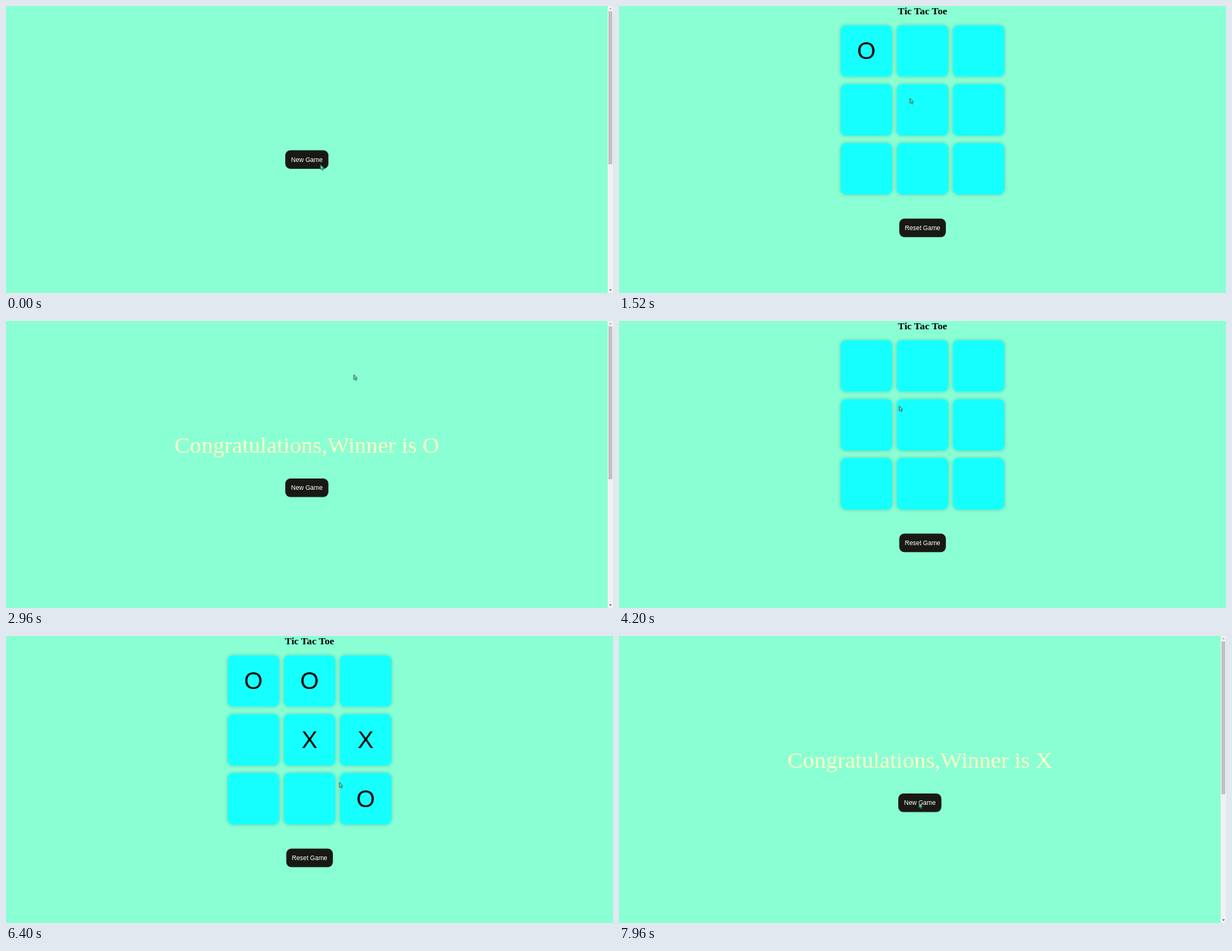
These frames come from a looping animation (800x379 px, 8000 ms). An HTML page:

```html
<!DOCTYPE html>
<html lang="en">
<head>
<meta charset="utf-8">
<title>Tic Tac Toe</title>
<style>
  html, body { margin: 0; width: 100%; height: 100%; overflow: hidden; background: #8affd4; }
  svg { display: block; width: 100%; height: 100%; }
  text { text-anchor: middle; }
  .sans { font-family: "Liberation Sans", Arial, sans-serif; }
  .serif { font-family: "Liberation Serif", "Times New Roman", serif; }
  .mark { font-size: 31.5px; }
  .label { font-size: 8.33px; fill: #fff; }
</style>
</head>
<body>
<svg viewBox="0 0 800 379">
  <defs>
    <filter id="shadow" x="-20%" y="-20%" width="140%" height="140%">
      <feDropShadow dx="0" dy="0" stdDeviation="2.4" flood-color="#000" flood-opacity=".22"/>
    </filter>
  </defs>
  <rect width="800" height="379" fill="#8affd4"/>

  <g id="board">
    <text class="serif" x="400" y="11" font-size="13.33" font-weight="700">Tic Tac Toe</text>
    <g id="cells"></g>
    <g transform="translate(400.1 293)">
      <rect x="-30.7" y="-12.2" width="61.4" height="24.4" rx="6.67" fill="#191913"/>
      <text class="sans label" y="2.8">Reset Game</text>
    </g>
  </g>

  <g id="result">
    <text id="message" class="serif" x="396.5" y="174" font-size="30.4" fill="#ffffc7"></text>
    <g id="newGame">
      <rect x="-28.4" y="-12.2" width="56.8" height="24.4" rx="6.67" fill="#191913"/>
      <text class="sans label" y="2.8">New Game</text>
    </g>
    <rect x="793" width="7" height="379" fill="#f1f1f1"/>
    <rect x="794" y="7" width="5" height="202" fill="#c1c1c1"/>
    <path d="M795 4.3h3.4l-1.7-2z" fill="#a3a3a3"/>
    <path d="M795 374.2h3.4l-1.7 2z" fill="#505050"/>
  </g>

  <path id="cursor" d="M.4.4V6.9L1.9 5.6 3 8 4.2 7.4 3.2 5.2H5.1Z"
        fill="#5be0b4" stroke="#35543f" stroke-width=".7" stroke-linejoin="round"/>
</svg>

<script>
const LOOP = 8000;
const CELL = { x: 292.1, y: 25.5, dx: 74, dy: 77.8, size: 67.8 };
const REST_BEFORE = 160, REST_AFTER = 100;
const $ = id => document.getElementById(id);

// Clicks (time, x, y); the game below decides what each one does
const clicks = [
  [280, 414, 209],
  [1000, 328, 72], [1680, 383, 121.5], [2080, 396, 68], [2480, 464, 130], [2860, 458, 70.5],
  [3660, 401, 222],
  [4600, 356, 68], [4920, 392, 130], [5200, 400, 68], [5520, 463, 129],
  [5820, 521, 172], [6180, 476, 213], [6820, 321, 129],
  [7660, 562, 161], [LOOP, 395, 220]
];

function cellAt(x, y) {
  const col = Math.floor((x - CELL.x) / CELL.dx);
  const row = Math.floor((y - CELL.y) / CELL.dy);
  const inside = col >= 0 && col < 3 && row >= 0 && row < 3;
  return inside ? row * 3 + col : -1;
}

// Start cell and step of every row, column and diagonal
const lines = [0, 1, 2].flatMap(i => [[3 * i, 1], [i, 3]]).concat([[0, 4], [2, 2]]);

function winnerOf(grid) {
  const line = lines.find(([a, d]) =>
    grid[a] && grid[a] === grid[a + d] && grid[a] === grid[a + 2 * d]);
  return line ? grid[line[0]] : "";
}

function gameAt(t) {
  let playing = false, winner = "", turn = 0, grid = [];
  for (const [time, x, y] of clicks) {
    if (time > t) break;
    const cell = cellAt(x, y);
    if (!playing) {
      // Only the New Game button reacts here
      if (Math.abs(x - 396.5) < 28 && y > 190 && y < 233) {
        playing = true;
        turn = 0;
        grid = [];
      }
    } else if (cell >= 0 && !grid[cell]) {
      grid[cell] = "OX"[turn++ % 2];
      winner = winnerOf(grid);
      playing = !winner;
    }
  }
  return { playing, winner, grid };
}

function cursorAt(t) {
  const i = clicks.findIndex(c => c[0] + REST_AFTER > t);
  const [time, x, y] = clicks[i];
  const [prevTime, px, py] = clicks[i - 1] || clicks[i];
  const from = prevTime + REST_AFTER;
  const to = Math.max(time - REST_BEFORE, from + 1);
  const p = Math.min(1, Math.max(0, (t - from) / (to - from)));
  const e = p * p * (3 - 2 * p);
  return [px + (x - px) * e, py + (y - py) * e];
}

function add(parent, tag, attrs) {
  const el = document.createElementNS("http://www.w3.org/2000/svg", tag);
  for (const key in attrs) el.setAttribute(key, attrs[key]);
  return parent.appendChild(el);
}

const marks = Array.from({ length: 9 }, (_, i) => {
  const x = CELL.x + CELL.dx * (i % 3);
  const y = CELL.y + CELL.dy * Math.floor(i / 3);
  add($("cells"), "rect", {
    x, y, width: CELL.size, height: CELL.size, rx: 6.67, fill: "#14ffff", filter: "url(#shadow)"
  });
  return add($("cells"), "text", { class: "sans mark", x: x + CELL.size / 2, y: y + 44.8 });
});

function show(id, on) {
  $(id).setAttribute("visibility", on ? "visible" : "hidden");
}

function draw(t) {
  const { playing, winner, grid } = gameAt(t);
  show("board", playing);
  show("result", !playing);
  $("message").textContent = winner ? `Congratulations,Winner is ${winner}` : "";
  $("newGame").setAttribute("transform", `translate(396.5 ${winner ? 220.2 : 202.8})`);
  marks.forEach((mark, i) => { mark.textContent = grid[i] || ""; });
  $("cursor").setAttribute("transform", `translate(${cursorAt(t)})`);
}

const start = performance.now();
function tick() {
  draw((performance.now() - start) % LOOP);
  requestAnimationFrame(tick);
}
tick();
</script>
</body>
</html>
```
